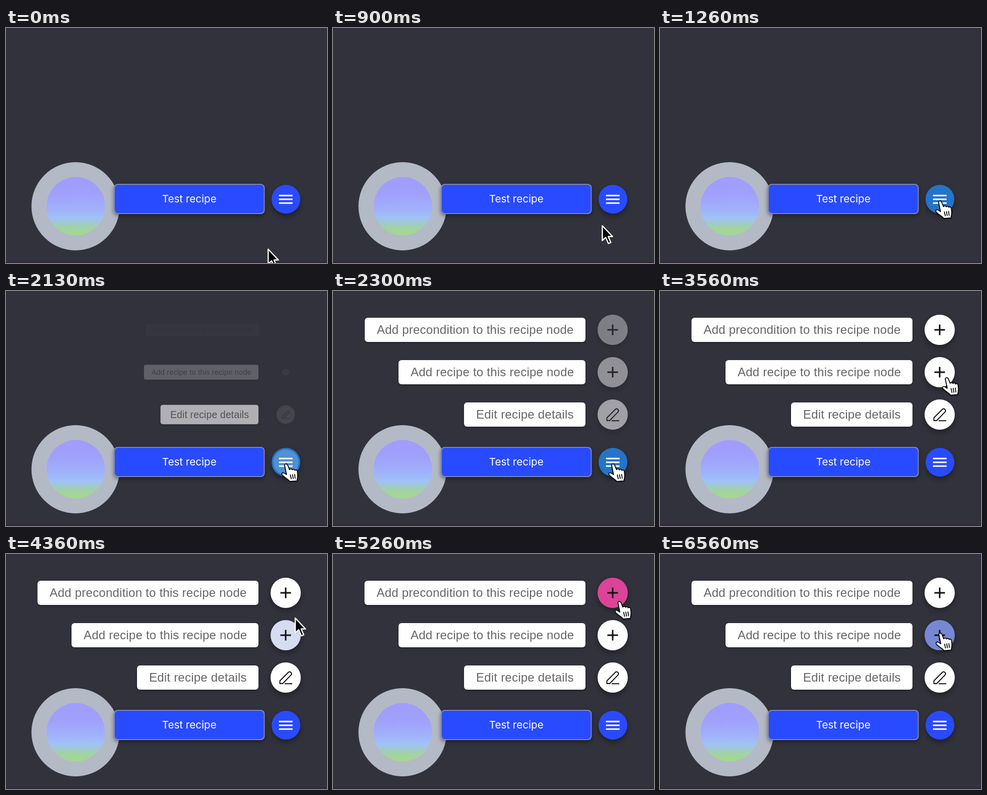
Animation of 637 by 466 pixels, one loop 6.63 s. Source, as an HTML page with a canvas:

```html
<!DOCTYPE html>
<html lang="en">
<head>
<meta charset="utf-8">
<title>Recipe menu</title>
<style>
  html, body { margin: 0; width: 100%; height: 100%; overflow: hidden; background: #32323c; }
  canvas { display: block; }
</style>
</head>
<body>
<canvas id="stage" width="637" height="466"></canvas>
<script>
const ctx = document.getElementById('stage').getContext('2d');
const LOOP = 6630;
const BG = [50, 50, 60], WHITE = [255, 255, 255];
const BLUE = [41, 75, 255], BLUE_HOVER = [36, 116, 200];
const FAB_X = 555, LABEL_RIGHT = 501;
const MAIN = { x: 555.5, y: 339.5, r: 28.5 };

// Menu rows, bottom to top; hover holds [enter, leave] times.
const rows = [
  { text: 'Edit recipe details', left: 260, y: 245, open: 2050, icon: pencil,
    tint: [140, 190, 170], hover: [[2960, 3340]] },
  { text: 'Add recipe to this recipe node', left: 130, y: 161, open: 2081, icon: plus,
    tint: [118, 136, 212], hover: [[3560, 4270], [5410, LOOP + 500]] },
  { text: 'Add precondition to this recipe node', left: 62.5, y: 77, open: 2113, icon: plus,
    tint: [219, 68, 152], hover: [[4460, 5380]] }
];

// Pointer moves: start, duration, target, sideways bow.
const moves = [
  [630, 540, 555.5, 343, -4],
  [2600, 470, 576, 250, 2],
  [3265, 340, 568, 168, 3],
  [4170, 340, 568, 94, 5],
  [5250, 310, 556, 157, 13]
];

const clamp = v => Math.max(0, Math.min(1, v));
const smooth = v => v * v * (3 - 2 * v);
const mix = (a, b, k) => a.map((v, i) => v + (b[i] - v) * k);
const css = c => `rgb(${c.map(Math.round).join(',')})`;

function bezier(x1, y1, x2, y2) {
  const at = (a, b, s) => 3 * (1 - s) * (1 - s) * s * a + 3 * (1 - s) * s * s * b + s * s * s;
  return v => {
    if (v <= 0 || v >= 1) return clamp(v);
    let lo = 0, hi = 1;
    for (let i = 0; i < 20; i++) {
      const mid = (lo + hi) / 2;
      if (at(x1, x2, mid) < v) lo = mid; else hi = mid;
    }
    return at(y1, y2, lo);
  };
}
const standard = bezier(.4, 0, .2, 1);
const ease = bezier(.25, .1, .25, 1);

const hoverLevel = (t, spans) => Math.max(...spans.map(([on, off]) =>
  standard(clamp((t - on) / 200)) * (1 - standard(clamp((t - off) / 200)))));

function shadow(alpha, dy, blur) {
  ctx.shadowColor = `rgba(0,0,0,${alpha})`;
  ctx.shadowOffsetY = dy;
  ctx.shadowBlur = blur;
}

function disc(x, y, r, fill) {
  ctx.beginPath();
  ctx.arc(x, y, r, 0, Math.PI * 2);
  ctx.fillStyle = fill;
  ctx.fill();
}

function box(x, y, w, h, r, fill) {
  ctx.beginPath();
  ctx.roundRect(x, y, w, h, r);
  ctx.fillStyle = fill;
  ctx.fill();
}

function plus() {
  ctx.fillRect(-10.5, -1.5, 21, 3);
  ctx.fillRect(-1.5, -10.5, 3, 21);
}

const pencilPath = new Path2D('M-11.5 12V6.5L5.5-10.5Q8-12.5 10.5-10.2Q12.8-7.5 10.6-5.2L-6 12ZM-2 12.2H13');
function pencil() {
  ctx.lineWidth = 1.9;
  ctx.lineJoin = 'round';
  ctx.stroke(pencilPath);
}

function drawNode() {
  disc(138, 353.5, 87.5, '#b4b9c6');
  const g = ctx.createLinearGradient(0, 295, 0, 412);
  [[0, '#a09cfd'], [.3, '#a0a0fb'], [.55, '#a0b1fb'], [.7, '#a1c2f8'],
   [.79, '#a1caca'], [.88, '#a2d49c'], [1, '#a3d88f']].forEach(s => g.addColorStop(...s));
  disc(138.5, 353.5, 58, g);
}

function drawTitle() {
  ctx.save();
  shadow(.45, 3, 8);
  box(214, 309, 299.5, 60, 8, '#7f85a8');
  ctx.restore();
  box(216, 311, 295.5, 56, 6.5, css(BLUE));
  ctx.fillStyle = '#fff';
  ctx.font = '20.6px Inter, sans-serif';
  ctx.textAlign = 'center';
  ctx.letterSpacing = '0px';
  ctx.fillText('Test recipe', 363.7, 346);
}

function drawMain(t) {
  const { x, y, r } = MAIN;
  ctx.save();
  shadow(.4, 5, 11);
  disc(x, y, r, css(mix(BLUE, BLUE_HOVER, hoverLevel(t, [[1050, 2770]]))));
  ctx.restore();
  const grow = standard(clamp((t - 1930) / 550));
  const glow = .2 * clamp((t - 1930) / 60) * (1 - clamp((t - 2140) / 150));
  if (glow > 0) disc(x, y, Math.min(r, 13 + 23 * grow), `rgba(255,255,255,${glow})`);
  ctx.fillStyle = '#fff';
  for (const dy of [-7.5, 0, 7.5]) ctx.fillRect(x - 13.8, y + dy - 1.3, 27, 3);
}

function drawRow(row, t) {
  const age = t - row.open;
  if (age <= 0) return;
  const shown = standard(clamp(age / 200));
  const fade = ease(clamp(age / 800));

  ctx.save();
  ctx.translate(LABEL_RIGHT, row.y);
  ctx.scale(.5 + shown / 2, .5 + shown / 2);
  const w = LABEL_RIGHT - row.left;
  ctx.save();
  shadow(.3 * shown, 2, 4);
  box(-w, -24, w, 48, 6, css(mix(BG, WHITE, shown)));
  ctx.restore();
  ctx.fillStyle = css(mix(BG, [102, 102, 102], shown));
  ctx.font = '24px "Liberation Sans", Arial, sans-serif';
  ctx.letterSpacing = '0.225px';
  ctx.textAlign = 'left';
  ctx.fillText(row.text, 24 - w, 8.3);
  ctx.restore();

  ctx.save();
  ctx.translate(FAB_X, row.y);
  ctx.scale(shown, shown);
  ctx.save();
  shadow(.38 * fade, 5, 12);
  const face = mix(WHITE, row.tint, hoverLevel(t, row.hover));
  disc(0, 0, 30, css(mix(BG, face, fade)));
  ctx.restore();
  ctx.fillStyle = ctx.strokeStyle = css(mix(BG, [15, 15, 15], fade));
  row.icon();
  ctx.restore();
}

function pointerAt(t) {
  let x = 519, y = 436;
  for (const [start, span, tx, ty, bow] of moves) {
    if (t < start) break;
    const p = smooth(clamp((t - start) / span));
    x += (tx - x) * p + bow * Math.sin(Math.PI * p);
    y += (ty - y) * p;
  }
  return [x, y];
}

const arrow = new Path2D('M1.2 2.5V32L8 25.7L13.2 37.8L18 35.8L12.9 24H21.5Z');
const hand = new Path2D('M-2.7 2C-2-.6 2.2-.8 3.4 2L7 11.3C8 9 11.8 9 12.6 11.6' +
  'C13.8 9.6 17 10 17.6 12.6C19 11 22 11.5 22.6 14.5L23.3 22C23.6 27 22 29 22 33.5L7.5 34.6' +
  'C5 30-3.5 27-7.8 21.2C-9.6 17.6-5 16-2 19L1.2 21Z');
const knuckles = new Path2D('M8.8 21.5L10.6 29.5M13 21L14.4 29M17.2 20.5L18.3 28.5');

function drawPointer(t) {
  const [x, y] = pointerAt(t);
  const over = (cx, cy, r) => Math.hypot(x - cx, y - cy) < r;
  const active = over(MAIN.x, MAIN.y, MAIN.r) ||
    rows.some(row => t > row.open && over(FAB_X, row.y, 30));
  ctx.save();
  ctx.translate(x, y);
  ctx.lineJoin = ctx.lineCap = 'round';
  ctx.save();
  shadow(.3, 2, 3);
  ctx.fillStyle = active ? '#fff' : '#000';
  ctx.fill(active ? hand : arrow);
  ctx.restore();
  ctx.strokeStyle = active ? '#000' : '#fff';
  ctx.lineWidth = active ? 1.7 : 2.4;
  ctx.stroke(active ? hand : arrow);
  if (active) ctx.stroke(knuckles);
  ctx.restore();
}

function draw(now) {
  const t = now % LOOP;
  ctx.fillStyle = css(BG);
  ctx.fillRect(0, 0, 637, 466);
  ctx.fillStyle = '#33293a';
  ctx.fillRect(0, 463, 637, 3);
  drawNode();
  drawTitle();
  drawMain(t);
  rows.forEach(row => drawRow(row, t));
  drawPointer(t);
}

let begin;
function frame(now) {
  begin ??= now;
  draw(Math.max(0, now - begin));
  requestAnimationFrame(frame);
}
requestAnimationFrame(frame);
</script>
</body>
</html>
```
